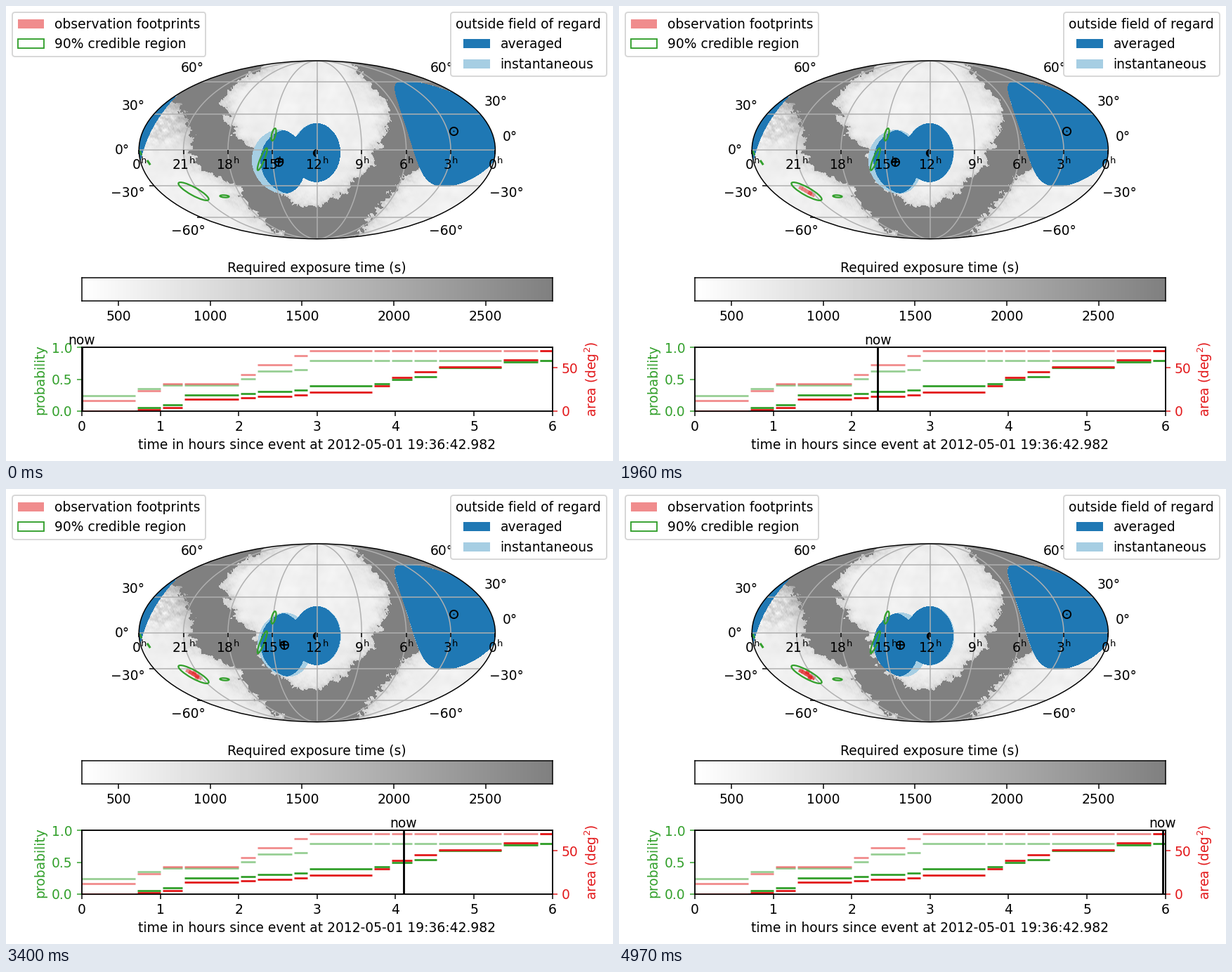
Write a matplotlib script that moves like this. It is 864 by 648 pixels and loops after 5 s.

```python
import numpy as np
import matplotlib.pyplot as plt
from matplotlib.animation import FuncAnimation
from matplotlib.collections import LineCollection
from matplotlib.colors import LinearSegmentedColormap
from matplotlib.patches import Ellipse, Patch, Polygon
from matplotlib.path import Path

plt.rcParams["font.family"] = "DejaVu Sans"

W, H, DPI = 864, 648, 135
FRAMES, LOOP_MS, HOURS = 181, 5000, 6
BLUE, PALE_BLUE, GREEN, RED = "#1f78b4", "#a6cee3", "#33a02c", "#e31a1c"
GREYS = LinearSegmentedColormap.from_list("sky", ["#ffffff", "#808080"], N=128)

CX, CY, A, B = 442.8, 204.8, 253.6, 126.8     # sky ellipse in pixels
X0, X1, Y0, Y1 = 188, 698, 76, 334            # image box around it

# --- Mollweide projection, 12h in the middle, east to the left ---
theta_tab = np.linspace(-np.pi / 2, np.pi / 2, 2001)
dec_tab = np.degrees(np.arcsin(np.clip(
    (2 * theta_tab + np.sin(2 * theta_tab)) / np.pi, -1, 1)))


def project(ra, dec):
    ra, dec = np.broadcast_arrays(ra, dec)
    theta = np.interp(dec, dec_tab, theta_tab)
    x = CX + A * (180 - ra) / 180 * np.cos(theta)
    return x, CY - B * np.sin(theta)


def unit(ra, dec):
    ra, dec = np.radians(ra), np.radians(dec)
    return np.array([np.cos(dec) * np.cos(ra), np.cos(dec) * np.sin(ra),
                     np.sin(dec)])


px, py = np.meshgrid(np.arange(X0, X1) + 0.5, np.arange(Y0, Y1) + 0.5)
u, v = (px - CX) / A, (CY - py) / B
inside = u**2 + v**2 <= 1
theta = np.arcsin(np.clip(v, -1, 1))
dec_map = np.interp(theta, theta_tab, dec_tab)
ra_map = 180 - 180 * u / np.maximum(np.cos(theta), 1e-3)
sky_xyz = unit(ra_map, dec_map)


# --- Sun, Earth and Moon: position at time t, exclusion radius ---
def sun(t):
    return 39 + 0.24 * t / HOURS, 15.2


def earth(t):
    return 219.3 - 8.8 * t / HOURS, -10.2


def moon(t):
    return 180.9 - 1.0 * t / HOURS, -2.4


BODIES = [(sun, 46), (earth, 26.8), (moon, 24.5)]


def excluded(t):
    out = np.zeros(px.shape, bool)
    for body, radius in BODIES:
        out |= np.tensordot(unit(*body(t)), sky_xyz, 1) > np.cos(np.radians(radius))
    return out & inside


# --- Exposure time map: dusty band with three clear areas ---
rng = np.random.default_rng(12)


def clouds(scales, waves=9):
    total = np.zeros(px.shape)
    for s in scales:
        for ang, ph in rng.uniform(0, 2 * np.pi, (waves, 2)):
            k = 2 * np.pi / (s * rng.uniform(0.7, 1.4))
            total += s**0.6 * np.sin(k * (px * np.cos(ang) + py * np.sin(ang)) + ph)
    return total / total.std()


def north_depth():
    edge = np.array([
        (385, 74), (362, 90), (340, 103), (322, 114), (311, 128), (309, 142),
        (316, 152), (312, 163), (324, 172), (322, 184), (338, 193), (352, 203),
        (362, 240), (376, 258), (390, 268), (405, 277), (432, 287), (452, 284),
        (470, 273), (485, 264), (497, 249), (511, 237), (521, 224), (526, 206),
        (537, 188), (543, 170), (545, 155), (540, 138), (528, 121), (513, 107),
        (503, 97), (498, 84), (492, 70), (440, 60)])
    dx, dy = edge[:, 0] - 430, edge[:, 1] - 175
    rim = np.interp(np.arctan2(py - 175, px - 430), np.arctan2(dy, dx),
                    np.hypot(dx, dy), period=2 * np.pi)
    return rim - np.hypot(px - 430, py - 175)


def left_depth():
    y = [130, 140, 150, 165, 180, 195, 210, 225, 235, 243, 255, 265, 272,
         285, 300, 315, 325, 334]
    x = [222, 246, 252, 258, 266, 262, 268, 268, 283, 303, 325, 336, 332,
         345, 360, 378, 394, 402]
    return 0.75 * (np.interp(py, y, x, left=150) - px)


def right_depth():
    y = [205, 225, 232, 240, 250, 258, 270, 280, 290, 300, 310, 320, 334]
    x = [640, 600, 585, 572, 562, 553, 545, 540, 528, 518, 512, 505, 492]
    return 0.75 * (px - np.interp(py, y, x, left=720))


fine, broad = clouds([22, 12, 7, 4]), clouds([60, 30, 14])
depth = np.maximum.reduce([north_depth(), left_depth(), right_depth()])
depth = depth + 3.2 * fine
haze = np.clip((212 - py) / 40, 0, 1) * (px < 290)
level = (0.12 + 0.28 * np.exp(-np.maximum(depth, 0) / 9) + 0.015 * broad
         + haze * (0.16 + 0.12 * fine))
level = np.where(depth > 0, np.clip(level, 0.05, 1), 1)


def rgb(color):
    return np.array([int(color[i:i + 2], 16) for i in (1, 3, 5)], np.uint8)


base = (GREYS(level)[..., :3] * 255).round().astype(np.uint8)
base[~inside] = 255
averaged = np.logical_and.reduce([excluded(t) for t in np.linspace(0, HOURS, 7)])


def sky_image(t):
    img = base.copy()
    img[excluded(t)] = rgb(PALE_BLUE)
    img[averaged] = rgb(BLUE)
    return img


# --- Sky panel, drawn in pixel coordinates ---
fig = plt.figure(figsize=(W / DPI, H / DPI), dpi=DPI, facecolor="white")
ax = fig.add_axes([0, 0, 1, 1])
ax.axis("off")
sky = ax.imshow(sky_image(0), extent=(X0, X1, Y1, Y0), aspect="auto",
                interpolation="nearest")
ax.set(xlim=(0, W), ylim=(H, 0))

starts = np.array([0, 0.708, 1.03, 1.31, 2.025, 2.24, 2.706, 2.903, 3.728,
                   3.952, 4.238, 4.552, 5.376, 5.842])
ends = np.append(starts[1:] - 0.03, HOURS)

# Seven pointings, each visited twice
fields = [(272, 266.5), (267.5, 264), (263, 261.3), (276.3, 268.8),
          (258.8, 258.8), (268.5, 261.2), (272, 268.5)]
visits = [0, 1, 2, 0, 3, 4, 5, 6, 1, 2, 3, 4, 5, 6]
tilt = np.radians(28 + 45 + 90 * np.arange(4))
square = 3.9 * np.column_stack([np.cos(tilt), np.sin(tilt)])
footprints = [ax.add_patch(Polygon(square + fields[i], fc=RED, ec="none",
                                   alpha=0.5, zorder=2)) for i in visits]

dec_line = np.linspace(-90, 90, 91)
grid = [np.column_stack(project(ra, dec_line)) for ra in range(45, 360, 45)]
grid += [np.column_stack(project([0, 360], dec)) for dec in range(-60, 61, 30)]
ax.add_collection(LineCollection(grid, colors="#b0b0b0", linewidths=0.8, zorder=3))

for x, y, w, h, angle in [(267, 264, 49, 11.5, 29), (311, 271, 13, 3.2, 4),
                          (381, 183, 18, 5.6, -76), (364.8, 218.2, 34, 6, -68)]:
    ax.add_patch(Ellipse((x, y), w, h, angle=angle, fc="none", ec=GREEN,
                         lw=1.2, zorder=4))
ax.plot([191, 192.5], [207.5, 211.5], color=GREEN, lw=1.3, zorder=4)
ax.plot([201.8, 204.5], [221, 225], color=GREEN, lw=1.6, zorder=4)

ax.add_patch(Ellipse((CX, CY), 2 * A, 2 * B, fc="none", ec="k", lw=0.8, zorder=5))
ticks = []
for ra in range(0, 361, 45):
    x, y = project(ra, 0)
    ticks.append([(x, y), (x, y + 6.6)])
    ax.text(x, 233, rf"${ra // 15 % 24}^\mathrm{{h}}$", ha="center", zorder=7)
for dec in (-30, -60):
    x, y = project(360, dec)
    ticks.append([(x - 6.6, y), (x, y)])
ax.add_collection(LineCollection(ticks, colors="k", linewidths=0.8, zorder=5))

for dec, left, right in [(60, (265, 87), (620, 87)), (30, (181.5, 141.5), (697, 135.5)),
                         (0, (165, 204), (717, 185)), (-30, (173, 265), (712, 265)),
                         (-60, (259.5, 319.5), (626, 319.5))]:
    label = f"{dec}°".replace("-", "−")
    for x, y in (left, right):
        ax.text(x, y + 6.8, label, ha="center", zorder=7)

arc = np.linspace(np.pi / 2, 3 * np.pi / 2, 25)
crescent = Path(np.vstack([np.column_stack([np.cos(arc), np.sin(arc)]),
                           np.column_stack([0.35 * np.cos(arc), np.sin(arc)])[::-1]]))


def place(line, pos):
    x, y = project(*pos)
    line.set_data([x], [y])


def symbol(body, marker, **kw):
    style = dict(color="k", mfc="none", ms=6, mew=1, ls="none", zorder=6) | kw
    line, = ax.plot([], [], marker=marker, **style)
    place(line, body(0))
    return body, line


symbols = [symbol(sun, "o"), symbol(sun, "o", ms=1, mfc="k", mew=0),
           symbol(earth, "o"), symbol(earth, "+"),
           symbol(moon, crescent, mfc="k", mew=0)]

# --- Colour bar ---
bar = fig.add_axes([0.125, 0.352, 0.775, 0.0515])
bar.imshow(np.linspace(0, 1, 128)[None], cmap=GREYS, aspect="auto",
           extent=(300, 2864, 0, 1), interpolation="nearest")
bar.set(yticks=[], xticks=range(500, 2501, 500), xlabel="Required exposure time (s)")
bar.xaxis.set_label_position("top")

# --- Timeline ---
prob_once = [0.246, 0.352, 0.41, 0.41, 0.505, 0.623, 0.65] + [0.80] * 7
prob_twice = [0, 0.055, 0.10, 0.255, 0.275, 0.31, 0.325, 0.40, 0.43, 0.49,
              0.535, 0.68, 0.77, 0.80]
area_once = [12.4, 23.2, 32, 32, 42.5, 53.3, 63.9] + [70.2] * 7
area_twice = [0, 1.8, 4.2, 14, 15.4, 17.3, 18.6, 22, 29.2, 38.6, 45.1, 51.6,
              59.4, 70.2]

prob = fig.add_axes([0.125, 0.11, 0.775, 0.1393])
area = prob.twinx()
area.xaxis.set_visible(False)
for axis, once, twice, color in [(prob, prob_once, prob_twice, GREEN),
                                 (area, area_once, area_twice, RED)]:
    axis.hlines(once, starts, ends, colors=color, alpha=0.5, lw=1.5)
    axis.hlines(twice, starts, ends, colors=color, lw=1.5)
    axis.tick_params(axis="y", colors=color)
prob.set(xlim=(0, HOURS), ylim=(0, 1), yticks=[0, 0.5, 1],
         xlabel="time in hours since event at 2012-05-01 19:36:42.982")
prob.set_ylabel("probability", color=GREEN)
area.set(ylim=(0, 73.7), yticks=[0, 50])
area.set_ylabel("area (deg$^2$)", color=RED)
now_line = area.axvline(0, color="k", lw=1.5)
now_text = area.text(0, 1, "now", ha="center", va="bottom",
                     transform=area.get_xaxis_transform())

# --- Legends ---
fig.legend(handles=[Patch(fc=RED, ec="none", alpha=0.5, label="observation footprints"),
                    Patch(fc="none", ec=GREEN, label="90% credible region")],
           loc="upper left")
fig.legend(handles=[Patch(fc=BLUE, ec="none", label="averaged"),
                    Patch(fc=PALE_BLUE, ec="none", label="instantaneous")],
           title="outside field of regard", loc="upper right")


def update(i):
    t = HOURS * i / (FRAMES - 1)
    sky.set_data(sky_image(t))
    for body, line in symbols:
        place(line, body(t))
    for patch, start in zip(footprints, starts):
        patch.set_visible(t > start)
    now_line.set_xdata([t, t])
    now_text.set_x(t)
    return [sky, now_line, now_text, *footprints, *(s for _, s in symbols)]


anim = FuncAnimation(fig, update, frames=FRAMES, interval=LOOP_MS / FRAMES,
                     repeat=True, repeat_delay=0, blit=False)
plt.show()
```
